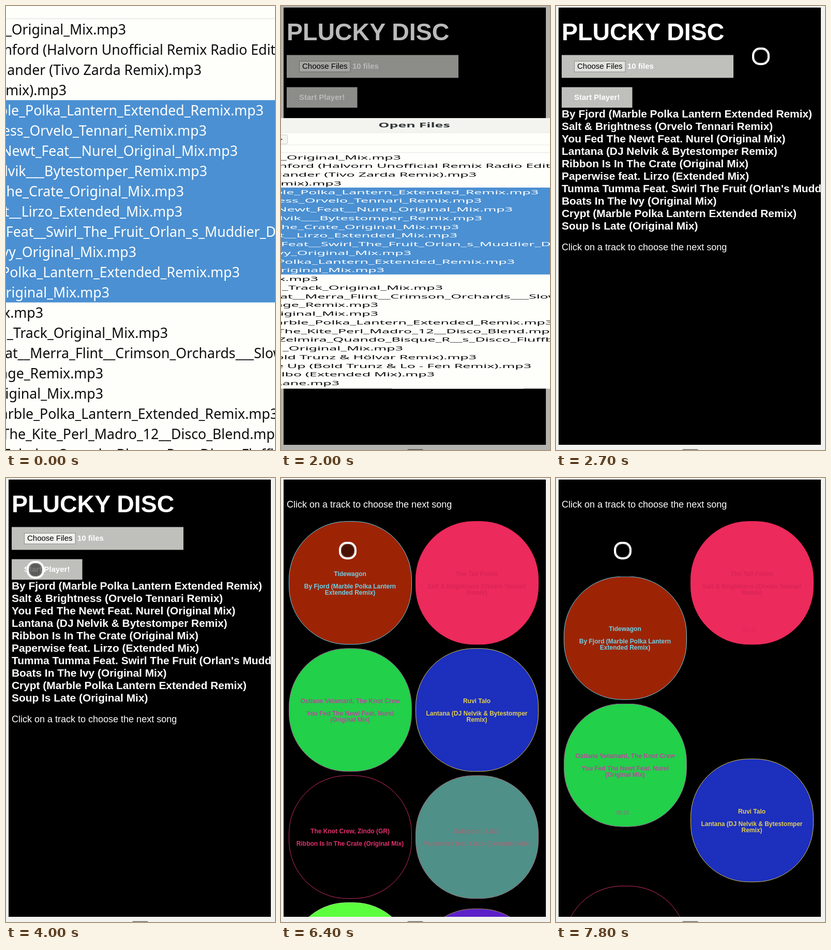
An HTML page that plays this animation: 520x856 px, repeating every 8000 ms.

```html
<!DOCTYPE html>
<html lang="en">
<head>
<meta charset="utf-8">
<title>Plucky Disc</title>
<style>
html, body { margin: 0; width: 100%; height: 100%; overflow: hidden; background: #f2f3ee; }
svg { display: block; width: 520px; height: 856px; }
.ui { font-family: "Liberation Sans", Arial, sans-serif; fill: #fff; }
.bold { font-weight: bold; }
.files { font: 26.7px "Noto Sans", "Open Sans", sans-serif; fill: #0c0c0c; }
.tile { font: bold 12px "Liberation Sans", Arial, sans-serif; text-anchor: middle; }
.time { font-weight: normal; font-size: 10px; }

/* every change is a hard step on one 8 s clock */
#dialog, #shade, #songs, #setup, #player, #pick, #arrow, #ring,
.drop1, .drop2, .drop3, .time { animation: 8s step-end infinite; }

#dialog { transform-origin: 0 477px; animation-name: shut; }
@keyframes shut {
  0% { transform: none; }
  25% { transform: scaleY(.4295); }
  26.25% { transform: scaleY(.14); }
  27.5%, 100% { transform: scaleY(0); }
}
#shade { animation-name: lift; }
@keyframes lift {
  0% { opacity: .27; }
  26.25% { opacity: .2; }
  27.5% { opacity: .1; }
  28.75%, 100% { opacity: 0; }
}
#songs { animation-name: songs; }
@keyframes songs { 0% { opacity: 0; } 27.5%, 100% { opacity: 1; } }
#setup { animation-name: leave; }
@keyframes leave { 0% { opacity: 1; } 52.5%, 100% { opacity: 0; } }
#player { animation-name: enter; }
@keyframes enter { 0% { opacity: 0; } 52.5%, 100% { opacity: 1; } }
#pick { animation-name: pick; }
@keyframes pick { 0% { fill: #e2e3de; } 50%, 100% { fill: #f0f0ed; } }

.drop1 { animation-name: drop1; }
@keyframes drop1 { 0% { transform: none; } 95%, 100% { transform: translateY(106.5px); } }
.drop2 { animation-name: drop2; }
@keyframes drop2 {
  0% { transform: none; }
  95% { transform: translateY(106.5px); }
  97.5%, 100% { transform: translateY(213px); }
}
.drop3 { animation-name: drop3; }
@keyframes drop3 {
  0% { transform: none; }
  95% { transform: translateY(106.5px); }
  97.5%, 100% { transform: translateY(320px); }
}
.time { animation-name: early; }
.time.late { animation-name: late; }
@keyframes early { 0% { opacity: 0; } 95%, 100% { opacity: .8; } }
@keyframes late { 0% { opacity: 0; } 97.5%, 100% { opacity: .8; } }

#arrow { animation-name: arrow; }
@keyframes arrow {
  0% { transform: translate(-99px, 0); }
  8.75% { transform: translate(3px, 113px); }
  10% { transform: translate(42px, 46px); }
  12.5% { transform: translate(60px, 42px); }
  13.75% { transform: translate(170px, 75px); }
  15% { transform: translate(257px, 106px); }
  17.5%, 100% { transform: translate(-99px, 0); }
}
#ring { animation-name: ring; }
@keyframes ring {
  0% { transform: translate(-99px, 0); }
  33.75% { transform: translate(396px, 97px); }
  35% { transform: translate(388px, 100px); }
  36.25% { transform: translate(360px, 110px); }
  37.5% { transform: translate(300px, 135px); }
  38.75% { transform: translate(225px, 165px); }
  40% { transform: translate(150px, 188px); }
  41.25% { transform: translate(95px, 198px); }
  42.5% { transform: translate(62px, 199px); }
  43.75% { transform: translate(55px, 191px); }
  45% { transform: translate(56px, 179px); }
  47.5% { transform: translate(57px, 177px); }
  58.75% { transform: translate(59px, 169px); }
  60% { transform: translate(49px, 159px); }
  62.5% { transform: translate(53px, 124px); }
  63.75% { transform: translate(96px, 120px); }
  65% { transform: translate(190px, 175px); }
  66.25% { transform: translate(249px, 166px); }
  68.75% { transform: translate(147px, 441px); }
  70% { transform: translate(167px, 429px); }
  72.5% { transform: translate(142px, 441px); }
  75% { transform: translate(146px, 420px); }
  76.25% { transform: translate(153px, 340px); }
  77.5% { transform: translate(147px, 240px); }
  78.75% { transform: translate(133px, 165px); }
  80%, 100% { transform: translate(129px, 140px); }
}
</style>
</head>
<body>
<svg viewBox="0 0 520 856">
  <defs>
    <clipPath id="view"><rect x="5" y="3" width="507" height="843"/></clipPath>
    <radialGradient id="lens">
      <stop offset=".78" stop-color="#000" stop-opacity=".52"/>
      <stop offset="1" stop-color="#888" stop-opacity=".6"/>
    </radialGradient>
  </defs>
  <rect width="520" height="856" fill="#f2f3ee"/>
  <rect x="5" y="3" width="507" height="843"/>
  <rect x="244" y="854.5" width="31" height="4" rx="2" fill="#6c6c6a"/>

  <g class="ui" clip-path="url(#view)">
    <g id="setup">
      <text class="bold" x="11" y="66" font-size="46.5">PLUCKY DISC</text>
      <g fill="#bfc0bb">
        <rect x="11" y="94.5" width="332" height="44"/>
        <rect x="11" y="156.5" width="136.5" height="39.5"/>
      </g>
      <rect id="pick" x="35.5" y="106.5" width="98.5" height="20.5" stroke="#8c8d88"/>
      <g font-size="15">
        <text x="41" y="121" fill="#000">Choose Files</text>
        <text class="bold" x="138" y="121">10 files</text>
        <text class="bold" x="35" y="181">Start Player!</text>
      </g>
      <g id="songs">
        <g id="list" class="bold" font-size="20.9"></g>
        <text x="11" y="471" font-size="18">Click on a track to choose the next song</text>
      </g>
    </g>
    <g id="player">
      <text x="11" y="57" font-size="18">Click on a track to choose the next song</text>
      <g id="tiles"></g>
    </g>
  </g>

  <rect id="shade" width="520" height="856"/>

  <g id="dialog">
    <rect y="-130" width="520" height="1214" fill="#fefefb"/>
    <rect y="-130" width="520" height="65" fill="#f3f4f0"/>
    <path d="M0 -65H520M0 24.5H520M0 -10H520" stroke="#dfe0dc"/>
    <rect x="-20" y="-55" width="32.5" height="41" rx="3" fill="#f4f4f1" stroke="#b9bab5"/>
    <path d="M-3 -41l5 6l-5 6" fill="none" stroke="#444" stroke-width="2"/>
    <rect y="181.5" width="520" height="390" fill="#4b90d2"/>
    <g id="rows" class="files">
      <text class="bold" x="257.5" y="-88" text-anchor="middle" fill="#2e3436">Open Files</text>
    </g>
  </g>

  <path id="arrow" d="M.7 .8V22.5L5 18.4L8.2 26.8L11.2 25.6L8 17.4L13.6 16.6Z" stroke="#fff" stroke-width="1.2"/>
  <g id="ring">
    <circle r="14" fill="url(#lens)"/>
    <rect x="-15" y="-15" width="30" height="30" rx="13" fill="none" stroke="#fff" stroke-width="4"/>
  </g>
</svg>
<script>
const $ = id => document.getElementById(id);

function add(parent, tag, attrs, text) {
  const el = document.createElementNS("http://www.w3.org/2000/svg", tag);
  for (const key in attrs) el.setAttribute(key, attrs[key]);
  if (text) el.textContent = text;
  return parent.appendChild(el);
}

// File rows: a positive number is the right end, otherwise the left start.
[
  ["_Original_Mix.mp3", 232],
  ["Brinford (Halvorn Unofficial Remix Radio Edit", 521],
  ["lander (Tivo Zarda Remix).mp3", 378],
  ["emix).mp3", 117],
  ["ble_Polka_Lantern_Extended_Remix.mp3", 498],
  ["ness_Orvelo_Tennari_Remix.mp3", 388],
  ["Newt_Feat__Nurel_Original_Mix.mp3", 448],
  ["elvik___Bytestomper_Remix.mp3", 389],
  ["The_Crate_Original_Mix.mp3", 344],
  ["t__Lirzo_Extended_Mix.mp3", 341],
  ["_Feat__Swirl_The_Fruit_Orlan_s_Muddier_Dub", -12],
  ["Ivy_Original_Mix.mp3", 252],
  ["Polka_Lantern_Extended_Remix.mp3", 452],
  ["Original_Mix.mp3", 200],
  ["Mix.mp3", 72],
  ["_Track_Original_Mix.mp3", 313],
  ["at__Merra_Flint__Crimson_Orchards___Slow", -2],
  ["nge_Remix.mp3", 188],
  ["Original_Mix.mp3", 188],
  ["Marble_Polka_Lantern_Extended_Remix.mp3", 526],
  ["The_Kite_Perl_Madro_12__Disco_Blend.mp3", 535],
  ["Zelmira_Quando_Bisque_R__s_Disco_Fluffball", -6],
  ["_Original_Mix.mp3", 236],
  ["Bold Trunz & Hölvar Remix).mp3", 378],
  ["ke Up (Bold Trunz & Lo - Fen Remix).mp3", 484],
  ["lbo (Extended Mix).mp3", 297],
  ["Lane.mp3", 113]
].forEach(([name, x], i) => add($("rows"), "text", {
  x, y: 54.5 + 39 * i,
  "text-anchor": x > 0 ? "end" : "start",
  fill: i > 3 && i < 14 ? "#fff" : "#0c0c0c"
}, name));

[
  "By Fjord (Marble Polka Lantern Extended Remix)",
  "Salt & Brightness (Orvelo Tennari Remix)",
  "You Fed The Newt Feat. Nurel (Original Mix)",
  "Lantana (DJ Nelvik & Bytestomper Remix)",
  "Ribbon Is In The Crate (Original Mix)",
  "Paperwise feat. Lirzo (Extended Mix)",
  "Tumma Tumma Feat. Swirl The Fruit (Orlan's Muddier Dub)",
  "Boats In The Ivy (Original Mix)",
  "Crypt (Marble Polka Lantern Extended Remix)",
  "Soup Is Late (Original Mix)"
].forEach((song, i) => add($("list"), "text", { x: 11, y: 215 + 24 * i }, song));

// Tiles: motion, top, fill, ink, border, text lines, running time
[
  ["drop1", 84, "#9c2405", "#6fcfe6", "#6fcfe6",
    ["Tidewagon", "By Fjord (Marble Polka Lantern", "Extended Remix)"]],
  ["", 84, "#ec2a5b", "#d92458", "#ec2a5b",
    ["The Tall Foxes", "Salt & Brightness (Orvelo Tennari", "Remix)"], "05:42"],
  ["drop1", 329, "#22d04a", "#b64a9c", "#a0568c",
    ["Ostiane Velamard, The Knot Crew", "You Fed The Newt Feat. Nurel", "(Original Mix)"], "06:55"],
  ["drop2", 329, "#1c2fbd", "#e2cd52", "#d2be58",
    ["Ruvi Talo", "Lantana (DJ Nelvik & Bytestomper", "Remix)"]],
  ["drop2", 574, "#000", "#e2306f", "#c82c64",
    ["The Knot Crew, Zindo (GR)", "Ribbon Is In The Crate (Original Mix)"]],
  ["drop3", 574, "#4f9088", "#937079", "#9c727c",
    ["Oatspoon, Lirzo", "Paperwise feat. Lirzo (Extended Mix)"]],
  ["drop2", 819, "#5cff3e", "#8a7", "#9cf08c", []],
  ["drop3", 831, "#5c20c8", "#a98", "#a08868", []]
].forEach(([move, top, fill, ink, edge, lines, time], i) => {
  const left = i % 2 ? 260.5 : 15.5, mid = left + 118.5;
  const tile = add($("tiles"), "g", { class: "tile " + move, fill: ink });
  add(tile, "rect", { x: left, y: top - .3, width: 237, height: 237, rx: 112, fill, stroke: edge });
  const first = top + 122.5 - 6 * lines.length;
  lines.forEach((line, n) =>
    add(tile, "text", { x: mid - .5, y: first + 12 * (n ? n + 1 : 0) }, line));
  if (time) add(tile, "text", {
    class: i > 1 ? "time late" : "time", x: mid - 5, y: top + 213
  }, time);
});
</script>
</body>
</html>
```
